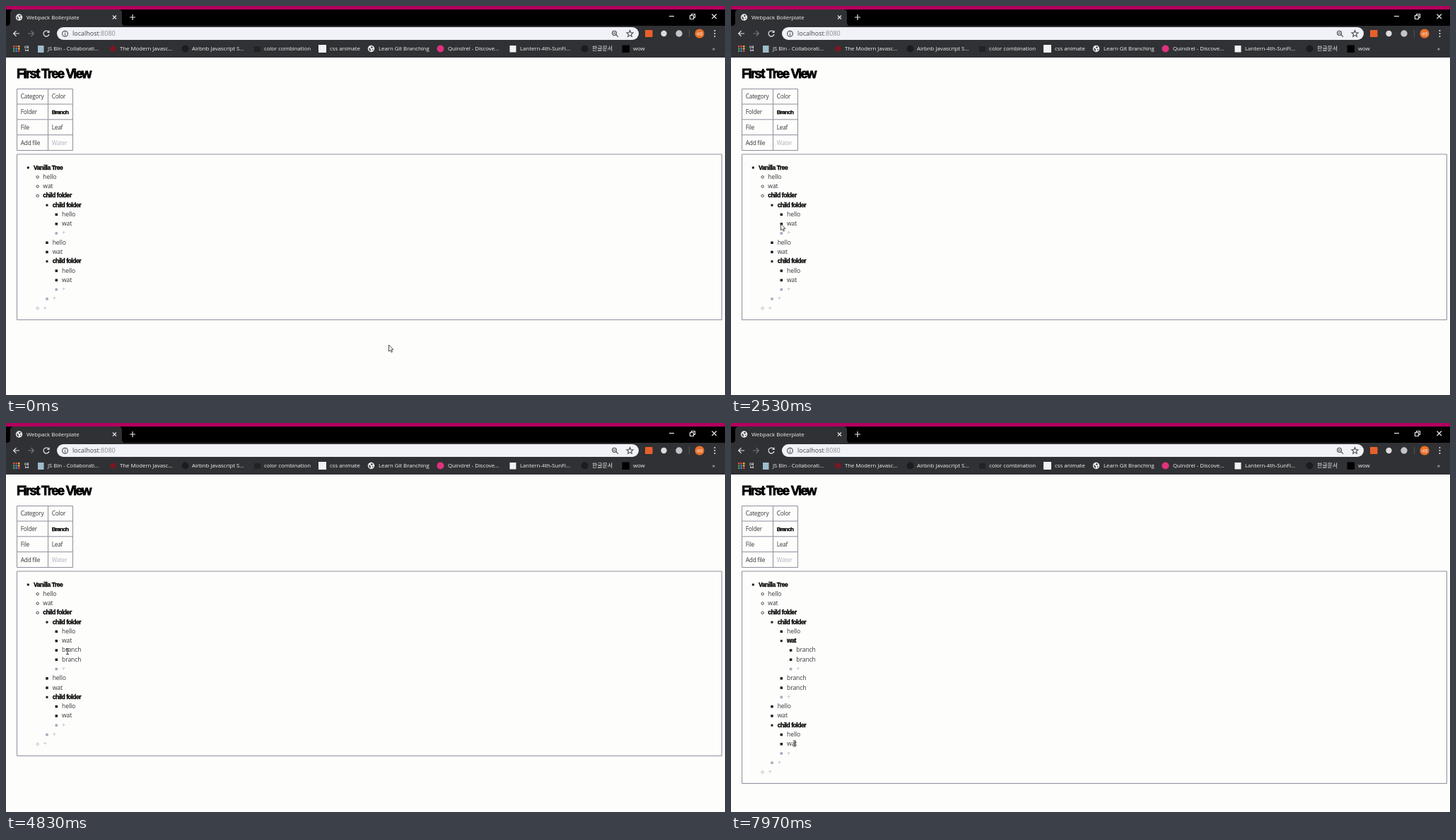
Recreate the animation shown at these times as an HTML page. Size 1017 by 551 pixels, loop 8000 ms.

```html
<!DOCTYPE html>
<html lang="en">
<head>
<meta charset="utf-8">
<title>Tree view</title>
<style>
html, body { margin: 0; width: 100%; height: 100%; overflow: hidden; background: #fdfdfc; }
svg { display: block; width: 1017px; height: 551px; }
text { font: 8.6px "Open Sans", "Noto Sans", sans-serif; letter-spacing: -.1px; fill: #37373b; }
.ui { font-size: 7.85px; letter-spacing: -.03px; fill: #f1f1f1; }
.ko { font: 8px "Noto Sans CJK KR", "Noto Sans CJK", sans-serif; fill: #f1f1f1; }
.url { font-size: 9px; letter-spacing: 0; fill: #45464a; }
.cell { font-size: 8.3px; letter-spacing: -.25px; }
.bold { font: bold 8.5px "Liberation Sans", sans-serif; letter-spacing: -.45px; fill: #000; stroke: #000; stroke-width: .3px; }
.title { font-size: 18.4px; letter-spacing: -1.65px; stroke-width: .8px; }
.tag { font-size: 8.1px; letter-spacing: -.75px; }
.add { fill: #b3b2c2; }
.picked { fill: #fff; stroke: none; }
.line { fill: none; stroke: #8f8f9c; }
.icon { fill: none; stroke: #e6e6e6; stroke-width: 1.2px; }
.dim { stroke: #77787b; }
.dark { stroke: #55565a; }
</style>
</head>
<body>
<svg xmlns="http://www.w3.org/2000/svg">
  <g id="frame"></g>
  <g id="tree"></g>
  <path id="arrow" d="M0 0V9.2L2.1 7.3L3.6 10.5L5 9.9L3.6 6.8H6.4Z" fill="#fff" stroke="#222" stroke-width=".8"/>
  <path id="beam" d="M-2 -4H-.5L0 -3.5L.5 -4H2M0 -3.5V3.5M-2 4H-.5L0 3.5L.5 4H2" fill="none" stroke="#222"/>
</svg>
<script>
const LOOP = 8000, ROW = 13.28, INDENT = 13.33;
const ADD1 = 3600, ADD2 = 4400, FOLD = 5480, UNPICK = 6150, ADD3 = 6690, ADD4 = 7180;
const $ = id => document.getElementById(id);

const text = (x, y, s, cls = '') => `<text x="${x}" y="${y}" class="${cls}">${s}</text>`;
const rect = (x, y, w, h, fill, r = 0) => `<rect x="${x}" y="${y}" width="${w}" height="${h}" rx="${r}" fill="${fill}"/>`;
const dot = (x, y, r, fill) => `<circle cx="${x}" cy="${y}" r="${r}" fill="${fill}"/>`;
const path = (d, cls = 'icon') => `<path d="${d}" class="${cls}"/>`;
const ring = (x, y, r, cls = 'icon') => `<circle cx="${x}" cy="${y}" r="${r}" class="${cls}"/>`;
const globe = (x, y) => dot(x, y, 4.7, '#eee') +
  `<path transform="translate(${x} ${y})" d="M-3.6 -1.5L-1 0L-.4 3.6L-2.6 2.4ZM0 -3.6L2.6 -2.4L1.4 -.6L-.6 -1.4ZM1 1L3.4 .4L2 2.8Z" fill="#47484b"/>`;

function drawTabs() {
  return rect(0, 0, 1017, 6, '#b3005e') + rect(0, 5, 1017, 24, '#000') +
    rect(0, 28, 1017, 45, '#303134') +
    '<path d="M2 28Q6 28 6 23V10Q6 5 11 5H159Q164 5 164 10V23Q164 28 168 28Z" fill="#303134"/>' +
    globe(18.5, 16) + text(29, 18.7, 'Webpack Boilerplate', 'ui') +
    path('M151 13.5L156 18.5M156 13.5L151 18.5') +
    path('M175 16H183M179 12V20') +
    path('M938 14.5H945') + path('M967.5 13.5H972.5V18.5H967.5ZM969.5 13V11.5H974.5V16.5H973') +
    path('M998.5 11.5L1005 18M1005 11.5L998.5 18');
}

function drawToolbar() {
  return path('M19 39H11M14.5 35.2L10.7 39L14.5 42.8') +
    path('M31 39H39M35.5 35.2L39.3 39L35.5 42.8', 'icon dim') +
    path('M60.3 36.6A4 4 0 1 0 61 40M61 34.8V37.5H58.2') +
    rect(72, 30, 823, 18, '#f1f1f8', 9) +
    ring(83.5, 39.2, 3.9, 'icon dark') + path('M83.5 38.7V41.4M83.5 36.7V37.7', 'icon dark') +
    text(94, 42.3, 'localhost<tspan fill="#8a8b90">:8080</tspan>', 'url') +
    ring(860.5, 38.3, 3, 'icon dark') + path('M862.7 40.5L866 43.8M859 38.3H862', 'icon dark') +
    path('M882.5 34.6L883.8 37.7L887 38L884.5 40.1L885.3 43.3L882.5 41.6L879.7 43.3L880.5 40.1L878 38L881.2 37.7Z', 'icon dark') +
    rect(904, 34, 10.5, 10, '#e8602c', 1) + dot(930.5, 39, 4.2, '#dcdcdc') + dot(952, 39, 4.7, '#c4c4c6') +
    rect(966, 34, 1, 10, '#55565a') + dot(981, 39, 6.6, '#e8702a') +
    '<text x="976.4" y="40.8" class="ko" style="font-size:5px">새봄</text>' +
    [35, 39, 43].map(y => dot(1002.5, y, 1, '#eee')).join('');
}

function drawBookmarks() {
  const labels = [[59, 'JS Bin - Collaborati...'], [161, 'The Modern Javasc...'], [263, 'Airbnb Javascript S...'],
    [365, 'color combination'], [458, 'css animate'], [527, 'Learn Git Branching'],
    [625, 'Quindrel - Discove...'], [727, 'Lantern-4th-SunFi...'], [887, 'wow']];
  const colors = ['#e04a3f', '#e04a3f', '#efb73e', '#4a9d5b', '#4b83d8', '#efb73e', '#4a9d5b', '#4b83d8', '#e04a3f'];
  return colors.map((c, i) => rect(10 + i % 3 * 3.5, 56 + (i / 3 | 0) * 3.3, 2.4, 2.4, c)).join('') +
    labels.map(([x, s]) => text(x, 63.2, s, 'ui')).join('') +
    text(25.5, 63.2, '앱', 'ko') + text(829, 63.3, '한글문서', 'ko') +
    rect(45, 56, 8.5, 10, '#9dbccb') + dot(151.5, 60.5, 4, '#7c1722') + dot(253.5, 60.5, 5, '#1b1c1e') +
    rect(351, 57, 9, 8, '#222325') + rect(442, 55, 11, 11, '#f2f2f2') + globe(516.5, 60.5) +
    dot(614.5, 60.5, 5, '#e0327c') + rect(712.5, 56, 9, 9.5, '#f2f2f2') + dot(818.5, 60.5, 5, '#1b1c1e') +
    rect(871.5, 55.5, 10.5, 10.5, '#000') + text(999, 63.2, '»', 'ui');
}

function drawLegend() {
  const rows = [['Category', 'Color'], ['Folder', 'Branch', 'bold tag'], ['File', 'Leaf'], ['Add file', 'Water', 'add']];
  return text(15, 101.5, 'First Tree View', 'bold title') +
    path('M15.5 117.5H94.5V204.5H15.5ZM59.5 117V204M15 139H94M15 160.8H94M15 182.6H94', 'line') +
    rows.map(([a, b, cls = ''], i) => {
      const y = 131.2 + i * 21.8;
      return text(20.8, y, a, 'cell') + text(64.7, y, b, 'cell ' + cls);
    }).join('');
}

// Each row is its depth, then its label; a star marks a folder.
function treeRows(t) {
  const inner = t < FOLD ? ['3wat'] :
    ['3*wat', t >= ADD3 && '4branch', t >= ADD4 && '4branch', '4+'];
  return ['0*Vanilla Tree', '1hello', '1wat', '1*child folder', '2*child folder', '3hello', ...inner,
    t >= ADD1 && '3branch', t >= ADD2 && '3branch', '3+', '2hello', '2wat', '2*child folder',
    '3hello', '3wat', '3+', '2+', '1+'].filter(Boolean);
}

function bullet(depth, x, y, folder, color) {
  if (depth === 0) return dot(x, y, 1.7, color);
  if (depth === 1) return `<circle cx="${x}" cy="${y}" r="1.7" fill="none" stroke="${color}" stroke-width=".8"/>`;
  const size = folder ? 3 : 3.5;
  return rect(x - size / 2, y - size / 2, size, size, color);
}

function drawTree(t) {
  const rows = treeRows(t), picked = t >= FOLD && t < UNPICK;
  const height = Math.round((rows.length - 1) * ROW + 35.8);
  return path(`M15.5 210H1012.5V${210 + height - .5}H15.5Z`, 'line') + rows.map((row, i) => {
    const depth = +row[0], folder = row[1] === '*', label = row.slice(folder ? 2 : 1);
    const x = 39 + depth * INDENT, y = 228.4 + i * ROW, add = label === '+';
    const hot = picked && folder && label === 'wat';
    const cls = folder ? 'bold' + (hot ? ' picked' : '') : add ? 'add' : '';
    return bullet(depth, x - 7.7, y + .6, folder, add ? '#a9a8ba' : '#1c1c1f') +
      (hot ? rect(x, y - 5.2, 13, 10, '#3390f5') : '') +
      text(add ? x + .3 : x, y + 3.1, label, cls);
  }).join('');
}

const track = [[0, 541.5, 480], [350, 541.5, 480], [830, 525.5, 474], [1050, 524, 473], [1660, 265, 380],
  [2300, 73, 311], [2530, 70.5, 308.5], [2800, 71, 310], [3200, 86, 322], [3720, 88, 322],
  [3980, 88.5, 334], [4500, 88.5, 334], [5150, 85.5, 314], [5840, 85.5, 314], [6450, 98, 322],
  [6700, 101, 322], [6830, 102, 335.5], [7260, 102, 335.5], [7900, 90, 454], [8000, 90, 454]];

function pointer(t) {
  const i = track.findIndex(k => k[0] > t), a = track[i - 1], b = track[i];
  const u = (t - a[0]) / (b[0] - a[0]), e = u * u * (3 - 2 * u);
  return [a[1] + (b[1] - a[1]) * e, a[2] + (b[2] - a[2]) * e];
}

$('frame').innerHTML = drawTabs() + drawToolbar() + drawBookmarks() + drawLegend();
let shown = -1;

function draw(now) {
  const t = now % LOOP;
  const stage = [ADD1, ADD2, FOLD, UNPICK, ADD3, ADD4].filter(s => t >= s).length;
  if (stage !== shown) {
    $('tree').innerHTML = drawTree(t);
    shown = stage;
  }
  const [x, y] = pointer(t), overText = x > 78 && x < 115;
  $('arrow').style.display = overText ? 'none' : '';
  $('beam').style.display = overText ? '' : 'none';
  $(overText ? 'beam' : 'arrow').setAttribute('transform', `translate(${x.toFixed(1)} ${y.toFixed(1)})`);
}

const start = performance.now();
function loop() {
  draw(performance.now() - start);
  requestAnimationFrame(loop);
}
loop();
</script>
</body>
</html>
```
